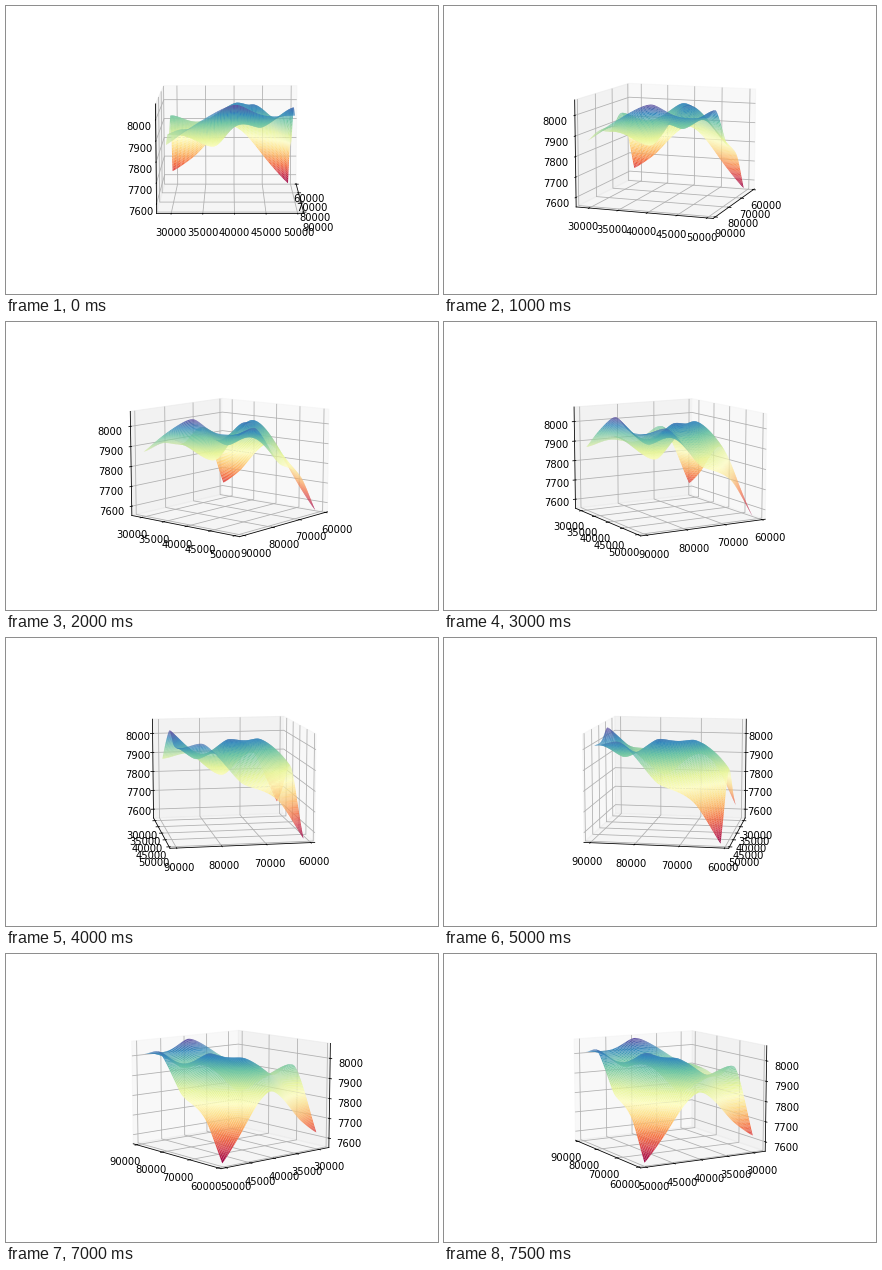
A matplotlib script for the animation above (8000 ms loop, 432 by 288 pixels).

```python
import numpy as np
import matplotlib.pyplot as plt
from matplotlib.animation import FuncAnimation

FRAMES, STEP_MS = 16, 500
ELEV, TURN = 10, 10            # degrees; azimuth turns by TURN each step
XLIM, YLIM, ZLIM = (59085, 91450), (27700, 51000), (7553, 8074)
FILL_XY, FILL_Z = 0.872, 0.96  # share of the box that the surface takes up
GRID = 90

# key points: x and y run from -1 to 1, height from 0 to 1
CORNERS = [(-1, -1, .13), (-1, 1, 0), (1, -1, .62), (1, 1, .9)]
HILLS = [(1, .1, 1), (-.44, .1, .9), (.11, .35, .92),
         (.6, 1, .94), (-.46, -1, .76), (.54, -.8, .72)]
HOLLOWS = [(.08, -.23, .52), (0, -1, .64), (.64, .48, .75)]
SLOPES = [(0, 1, .56), (-.6, 1, .37), (-.6, .6, .58),
          (-1, 0, .61), (-1, .6, .27), (-1, -.6, .3)]


def kernel(p, q):
    d2 = ((p[:, None] - q[None]) ** 2).sum(-1)
    return d2 * np.log(d2 + 1e-12)


def affine(p):
    return np.column_stack([np.ones(len(p)), p])


def thin_plate(knots, pts):
    """Smoothest surface through a few scattered knots."""
    p, h = knots[:, :2], knots[:, 2]
    a = affine(p)
    system = np.block([[kernel(p, p), a], [a.T, np.zeros((3, 3))]])
    w = np.linalg.solve(system, np.append(h, np.zeros(3)))
    return np.column_stack([kernel(pts, p), affine(pts)]) @ w


def to_data(t, lim, fill):
    """Map -1..1 into the middle part of an axis range."""
    lo, hi = lim
    return (lo + hi) / 2 + t * fill * (hi - lo) / 2


side = np.linspace(-1, 1, GRID)
x, y = np.meshgrid(side, side)
knots = np.array(CORNERS + HILLS + HOLLOWS + SLOPES)
height = thin_plate(knots, np.column_stack([x.ravel(), y.ravel()]))
height = np.clip(height, 0, 1).reshape(x.shape)

fig = plt.figure(figsize=(6, 4), dpi=72, facecolor="white")
fig.subplots_adjust(left=0.125, right=0.9, bottom=0.125, top=0.88)
ax = fig.add_subplot(projection="3d")
ax.plot_surface(to_data(x, XLIM, FILL_XY), to_data(y, YLIM, FILL_XY),
                to_data(2 * height - 1, ZLIM, FILL_Z), cmap="Spectral",
                rcount=GRID, ccount=GRID, linewidth=0, antialiased=True)
ax.set_xticks(range(60000, 90001, 10000))
ax.set_yticks(range(30000, 50001, 5000))
ax.set_zticks(range(7600, 8001, 100))
ax.set(xlim=XLIM, ylim=YLIM, zlim=ZLIM)


def update(i):
    # the tiny offset keeps the side wall choice stable when seen head-on
    ax.view_init(elev=ELEV, azim=TURN * i + 0.01)
    return []


anim = FuncAnimation(fig, update, frames=FRAMES, init_func=lambda: update(0),
                     interval=STEP_MS, repeat=True, repeat_delay=0, blit=False)
plt.show()
```
